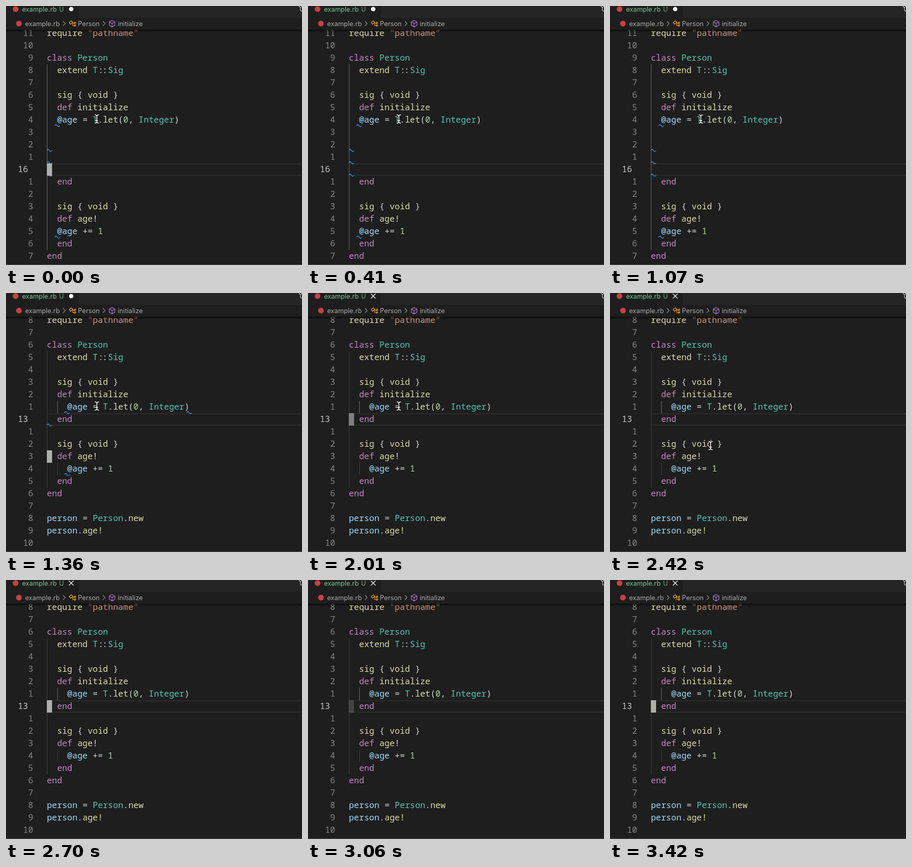
These frames come from a looping animation (572 by 502 pixels, 3.44 s). An HTML page with a canvas:

```html
<!DOCTYPE html>
<html lang="en">
<head>
<meta charset="utf-8">
<title>Ruby editor</title>
<style>
html, body { margin: 0; width: 100%; height: 100%; overflow: hidden; background: #1e1e1e; }
canvas { display: block; }
</style>
</head>
<body>
<canvas id="stage" width="572" height="502"></canvas>
<script>
const ctx = document.getElementById('stage').getContext('2d');
const LOOP = 3440, W = 572, H = 502;
const LEFT = 79, TOP = 41, LINE = 24, CHAR = 9.84;
const MONO = '16.4px "Noto Sans Mono", monospace';
const UI = '12.7px Inter, sans-serif';

const HEAD = ['require "pathname"', '', 'class Person', '  extend T::Sig', '', '  sig { void }', '  def initialize'];
const MESSY = {
  lines: [...HEAD, '  @age = T.let(0, Integer)', '', '', '', '', '  end', '',
    '  sig { void }', '  def age!', '  @age += 1', '  end', 'end'],
  row: 11, number: 16,
  guides: [[79, 3, 18, '#6a6a6a']],
  squiggles: [[94, 7], [79, 9], [79, 10], [79, 11], [94, 16]]
};
const TIDY = {
  lines: [...HEAD, '    @age = T.let(0, Integer)', '  end', '', '  sig { void }', '  def age!',
    '    @age += 1', '  end', 'end', '', 'person = Person.new', 'person.age!', ''],
  row: 8, number: 13,
  guides: [[79, 3, 14, '#404040'], [99, 7, 8, '#707070'], [99, 12, 13, '#404040']],
  squiggles: [[113, 7], [349, 7], [79, 8], [113, 12]]
};

// Caret: start time, opacity, row
const CARET = [
  [0, 1, 11], [350, 0.4, 11], [410, 0, 11], [1360, 1, 11], [1410, 1, 8],
  [2010, 0.67, 8], [2070, 0.25, 8], [2130, 0, 8], [2470, 1, 8],
  [3000, 0.67, 8], [3060, 0.25, 8], [3120, 0, 8], [3420, 1, 8]
];
const MOVES = [2300, 2360, 2420, 2470, 2530, 2590, 2640];

const TOKEN = /"[^"]*"|@\w+|\w+!?|::|[^\s\w]+/g;
function tokenColor(word) {
  if (/^(class|def|end)$/.test(word)) return '#c586c0';
  if (word[0] === '"') return '#ce9178';
  if (word[0] === '@' || word === 'person') return '#9cdcfe';
  if (/^[A-Z]/.test(word)) return '#4ec9b0';
  if (/^\d/.test(word)) return '#b5cea8';
  return /^\w/.test(word) ? '#dcdcaa' : '#d4d4d4';
}

const rowTop = row => TOP + row * LINE;
const lastBefore = (list, t, at = x => x) => list.filter(x => at(x) <= t).pop();

function rect(x, y, w, h, color) {
  ctx.fillStyle = color;
  ctx.fillRect(x, y, w, h);
}

function text(str, x, y, color, font, align = 'left') {
  ctx.font = font;
  ctx.textAlign = align;
  ctx.fillStyle = color;
  ctx.fillText(str, x, y);
}

function disc(x, y, r, color) {
  ctx.fillStyle = color;
  ctx.beginPath();
  ctx.arc(x, y, r, 0, Math.PI * 2);
  ctx.fill();
}

function stroke(path, color, width = 1) {
  ctx.strokeStyle = color;
  ctx.lineWidth = width;
  ctx.stroke(new Path2D(path));
}

function codeLine(line, y) {
  for (const m of line.matchAll(TOKEN)) {
    const x = LEFT + m.index * CHAR, color = tokenColor(m[0]);
    if (m[0] === '::') {
      text(':', x + 1.2, y, color, MONO);
      text(':', x + CHAR - 1.2, y, color, MONO);
    } else {
      text(m[0], x, y, color, MONO);
    }
  }
}

function squiggle(x, row) {
  const y = rowTop(row) + 22;
  stroke(`M${x} ${y + 1}q2.5 -4 5 0t5 0`, '#3794ff', 1.3);
}

function drawCode(doc, showSquiggles) {
  const y = rowTop(doc.row);
  rect(80, y, W - 80, 2, '#2a2a2a');
  rect(80, y + LINE - 2, W - 80, 2, '#2a2a2a');
  for (const [x, from, to, color] of doc.guides) rect(x, rowTop(from), 1, (to - from) * LINE, color);
  doc.lines.forEach((line, i) => {
    const base = rowTop(i) + 17;
    if (i === doc.row) text(doc.number, 23, base, '#c6c6c6', MONO);
    else text(Math.abs(i - doc.row), 52.6, base, '#858585', MONO, 'right');
    codeLine(line, base);
  });
  if (showSquiggles) doc.squiggles.forEach(s => squiggle(...s));
}

function drawCaret(t) {
  const [, alpha, row] = lastBefore(CARET, t, c => c[0]);
  ctx.globalAlpha = alpha;
  rect(LEFT, rowTop(row), 10, LINE, '#aeafad');
  ctx.globalAlpha = 1;
}

function drawHeader(saved) {
  rect(0, 0, W, 46, '#1e1e1e');
  rect(141, 0, W - 141, 23, '#252526');
  disc(18.5, 6, 5.5, '#cc3e44');
  text('example.rb', 31, 10.5, '#73c991', UI);
  text('U', 102.5, 10.5, '#61a87a', UI);
  if (saved) stroke('M121.5 1.5l9 9m0 -9l-9 9', '#f0f0f0', 1.4);
  else disc(126, 6, 4.3, '#ffffff');
  stroke('M566.5 0a2.5 2.5 0 0 0 5 0M569 2.5v5q0 2.5 3 2.5', '#c5c5c5', 1.2);

  disc(25, 34, 5.5, '#cc3e44');
  text('example.rb', 37, 38.5, '#a9a9a9', UI);
  text('Person', 139, 38.5, '#a9a9a9', UI);
  text('initialize', 216, 38.5, '#a9a9a9', UI);
  for (const x of [110, 187]) stroke(`M${x} 29.5l4.5 4.5l-4.5 4.5`, '#8a8a8a', 1.1);
  stroke('M122 32.5l4 -4l3 3l-4 4zM127.5 33h4M129 33v5h2.5M131.5 33l2 -2l1.5 1.5l-2 2zM131.5 38l2 -2l1.5 1.5l-2 2z',
    '#ee9d28', 1.2);
  stroke('M205 28l5.5 3v6.5l-5.5 3l-5.5 -3v-6.5zM199.5 31l5.5 3l5.5 -3M205 34v6.5', '#b180d7', 1.1);

  const shade = ctx.createLinearGradient(0, 46, 0, 51);
  shade.addColorStop(0, 'rgba(0,0,0,.6)');
  shade.addColorStop(1, 'rgba(0,0,0,0)');
  rect(0, 46, W, 5, shade);
}

function pointerAt(t) {
  const step = lastBefore(MOVES, t) || 2240;
  const u = ((step - 2240) / 400) ** 1.9, v = 1 - u;
  const curve = (a, b, c) => v * v * a + 2 * u * v * b + u * u * c;
  return [curve(175.5, 185, 500), curve(219, 404, 497)];
}

function drawPointer(t) {
  if (t >= 2700) return;
  const [x, y] = pointerAt(t);
  const beam = `M${x - 4} ${y - 8}q4 0 4 3v10q0 3 -4 3M${x + 4} ${y - 8}q-4 0 -4 3M${x + 4} ${y + 8}q-4 0 -4 -3M${x - 2.5} ${y + 3}h5`;
  stroke(beam, '#111111', 3.6);
  stroke(beam, '#ffffff', 1.5);
}

function draw(t) {
  const tidy = t >= 1360;
  rect(0, 0, W, H, '#1e1e1e');
  drawCode(tidy ? TIDY : MESSY, t < 1470);
  drawCaret(t);
  drawHeader(t >= 1410);
  rect(0, 501, W, 1, '#4a4a4a');
  drawPointer(t);
}

const start = performance.now();
function tick() {
  draw((performance.now() - start) % LOOP);
  requestAnimationFrame(tick);
}
tick();
</script>
</body>
</html>
```
